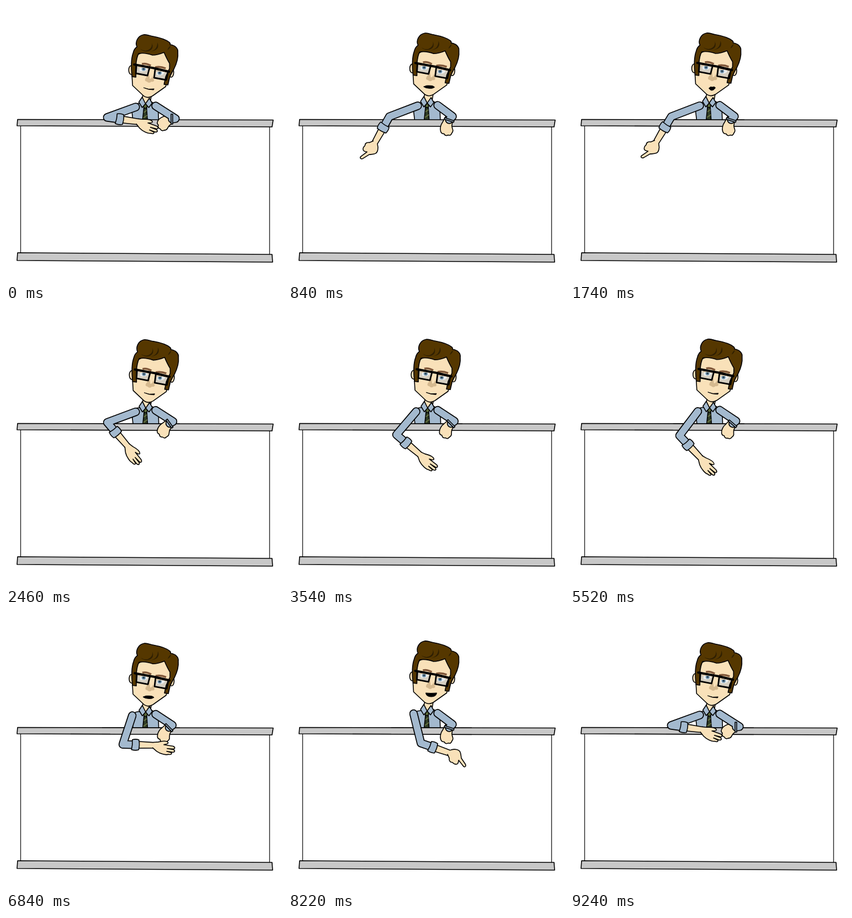
Recreate the animation shown at these times as an HTML page. Size 500x500 px, loop 9.96 s.

```html
<!DOCTYPE html>
<html lang="en">
<head>
<meta charset="utf-8">
<title>Presenter</title>
<style>
html, body { margin: 0; width: 100%; height: 100%; overflow: hidden; background: #fff; }
svg { display: block; width: 100vw; height: 100vh; }
.ln { stroke: #000; stroke-width: 1.6; stroke-linejoin: round; stroke-linecap: round; }
.side { fill: none; stroke: #222; stroke-width: 1.4; }
.skin { fill: #f9e1b9; }
.shirt { fill: #a3b9ce; }
.hair { fill: #553700; }
.bar { fill: #c8c8c8; }
.arm { fill: none; stroke-linejoin: round; stroke-linecap: round; }
.edge { stroke: #000; stroke-width: 15.4; }
.cloth { stroke: #a3b9ce; stroke-width: 12; }
</style>
</head>
<body>
<svg viewBox="0 0 500 500">
  <defs><clipPath id="above"><rect width="500" height="207"/></clipPath></defs>
  <path class="side" d="M26.500 217V448M477.500 218V450"/>

  <g clip-path="url(#above)">
    <g id="body">
      <path class="ln shirt" d="M243 176L236 177Q227 180 228 188L231 214H277L276 186Q272 177 262 173Z"/>
      <path class="ln skin" d="M249 158L264 160L262 172L253 180L246 172Z"/>
      <path class="ln" fill="#2f3c26" d="M250 184H255L257 214H247Z"/>
      <path class="ln" fill="#5b6a3a" d="M249 178H257L255 185H250Z"/>
      <path stroke="#66703f" stroke-width="2" d="M250 193L255 189M249 203L256 198"/>
      <path class="ln shirt" d="M247 165L241 174L247 184L253 177ZM260 167L265 176L259 184L253 177Z"/>
    </g>
  </g>

  <g id="head">
    <ellipse class="ln skin" cx="227.500" cy="116" rx="4.500" ry="8"/>
    <ellipse class="ln skin" cx="300" cy="120" rx="4.500" ry="9"/>
    <path class="ln skin" d="M232 92L229 128L230 144L248 161Q256 169 266 163L290 146L300 104L301 84L270 72Z"/>
    <path fill="#c9c9c5" fill-opacity=".75" d="M237 107L261 111L257 126L236 122ZM271 114L294 119L291 134L269 130Z"/>
    <path fill="#e9eef0" d="M242 112Q250 108 257 114Q254 120 243 118ZM273 119Q281 115 288 121Q284 127 274 125Z"/>
    <g id="eyes">
      <circle cx="250" cy="114" r="3.600" fill="#6f93ae"/><circle cx="250" cy="114" r="1.700" fill="#243a4b"/>
      <circle cx="279" cy="121" r="3.600" fill="#6f93ae"/><circle cx="279" cy="121" r="1.700" fill="#243a4b"/>
    </g>
    <path fill="#dcc8a8" d="M240 110Q249 106 258 112V114Q249 110 241 113ZM272 117Q281 113 290 119V121Q281 117 272 120Z"/>
    <path fill="#d5b98f" d="M260 122L253 132Q251 136 256 137Q260 141 264 137Q269 138 269 134L266 126Q265 132 261 132Z"/>
    <path fill="none" stroke="#80583a" stroke-width="3.500" d="M247 105Q254 103 263 108M271 111Q280 109 290 113"/>
    <path class="ln hair" d="M229 128C227 110 227 96 231 85Q233 77 238 74C234 66 239 54 250 52C257 51 262 55 267 55C278 57 291 61 297 66Q299 68 298 70C307 71 313 77 312 84C313 94 309 106 305 114Q299 124 297 130L294 143L287 142L290 128L297 113L297 104Q292 96 287 84Q275 89 266 89Q253 84 241 86Q237 93 236 108L236 129Z"/>
    <path fill="#2f1f02" d="M244 78Q254 84 261 78Q266 74 265 67Q269 77 261 81Q252 85 244 78ZM261 83Q275 80 275 66Q281 80 261 83ZM299 72Q295 74 293 80Q298 77 299 72Z"/>
    <path fill="none" stroke="#000" stroke-width="2.800" stroke-linejoin="round" d="M237 107L261 111L257 126L236 122ZM271 114L294 119L291 134L269 130Z"/>
    <path fill="none" stroke="#000" stroke-width="4" stroke-linecap="round" d="M233 106L260 111L271 113L296 119"/>
    <path id="mouth" stroke="#000" stroke-linejoin="round"/>
  </g>

  <path class="ln bar" d="M21 205.500L484 206.500L482 219L20 217Z"/>
  <path class="ln bar" d="M21 447L482 450L483 464L20 461Z"/>

  <path id="farHand" class="ln skin" d="M-3 8L8 10C14 12 21 11 25 8Q29 5 27 1Q31 -3 27 -7Q27 -12 22 -12Q17 -14 14 -11Q11 -9 9 -8L-3 -6"/>
  <path class="arm edge far"/>
  <path class="arm cloth far"/>
  <path id="farCuff" class="ln shirt" d="M-1 -9H2V9H-1Z"/>

  <path id="fore" class="ln skin" d="M18 -6.500L59 -5V5L18 6.500Z"/>
  <path id="hand" class="ln skin"/>
  <path class="arm edge near"/>
  <path class="arm cloth near"/>
  <path id="cuff" class="ln shirt" d="M17 -9Q23 -11 29 -9Q31 0 29 9Q23 11 16 9Q18 0 17 -9Z"/>
</svg>
<script>
const LOOP = 9960, STEP = 60, SWING = 830, UPPER = 55, FORE = 57;
const $ = id => document.getElementById(id);
const mix = (a, b, k) => a + (b - a) * k;
const ease = x => { const k = Math.max(0, Math.min(1, x)); return k * k * (3 - 2 * k); };
const polar = ([x, y], r, deg) => {
  const a = deg * Math.PI / 180;
  return [x + r * Math.cos(a), y + r * Math.sin(a)];
};
const put = (id, x, y, a = 0) => $(id).setAttribute('transform', `translate(${x} ${y}) rotate(${a})`);
const line = (cls, pts) => document.querySelectorAll(cls).forEach(p => p.setAttribute('d', 'M' + pts.join('L')));

// joint angles in degrees
const rest = { upper: 160, fore: 8, hand: 20 };
const gestures = [
  { from: 60, to: 2870, upper: 159, fore: 121, hand: 137, point: true },
  { from: 3060, to: 6040, upper: 112, fore: 82, hand: 88, point: false },
  { from: 6360, to: 9240, upper: 76, fore: 19, hand: 43, point: true }
];

const hands = {
  open: 'M-2 -5L6 -7C13 -10 21 -12 24 -9C25 -6 19 -5 17 -4L34 -4C39 -3 38 1 34 1L24 2L36 2C40 4 38 7 34 7L24 7L33 8C35 11 31 12 28 12C25 14 14 14 6 10L-2 5',
  point: 'M-4 -5C0 -12 6 -15 10 -14C15 -12 17 -9 20 -7L33 -4C37 -2 36 2 32 1L19 -1C22 3 23 6 20 8C17 11 14 9 13 10C10 13 6 11 4 8L-3 5'
};
const mouths = {
  smile: 'M250 148Q259 152 269 150L268 152Q258 152 250 148Z',
  small: 'M254 152Q257 148 260 150Q264 148 266 151Q263 156 259 156Q256 155 254 152Z',
  wide: 'M248 149Q254 146 259 147Q266 147 268 150Q264 153 258 152Q252 152 248 149Z',
  big: 'M252 146Q261 147 272 146Q271 153 262 153Q253 153 252 146Z'
};
const chatter = ['smile', 'small', 'wide', 'big', 'small'];

function draw(t) {
  const g = gestures.find(g => t < g.to) || gestures[2];
  const k = ease((t - g.from) / SWING) * ease((g.to - t) / SWING);
  const swing = 4 * k * (1 - k);
  const held = Math.max(0, t - g.from - SWING);
  const bounce = Math.exp(-held / 250) * Math.sin(held / 150);

  // forearm and hand trail the upper arm, then overshoot and settle
  const upper = mix(rest.upper, g.upper, k);
  const fore = mix(rest.fore, g.fore, k) - 14 * swing + 12 * bounce;
  const hand = mix(rest.hand, g.hand, k) - 26 * swing + 16 * bounce;
  const bob = 3.3 * swing - 3 * k - 2 * bounce;

  put('head', bob * .6 - .7, bob);
  put('body', bob * .2 - .3, bob * .4);
  put('eyes', -k, 0);
  const talking = k > (g.point ? .5 : .9);
  $('mouth').setAttribute('d', mouths[talking ? chatter[Math.floor(t / 120) % chatter.length] : 'smile']);

  const farElbow = [mix(307, 298, k), mix(204, 200, k)];
  const farWrist = [mix(301, 292, k), mix(205, 206, k)];
  line('.far', [[271, 181 + bob * .4], farElbow, farWrist]);
  put('farHand', ...farWrist, mix(155, 108, k));
  put('farCuff', ...farWrist, mix(180, 108, k));

  const shoulder = [227.5 + 7.5 * ease((upper - 90) / 70), 183 + bob * .8];
  const elbow = polar(shoulder, UPPER, upper);
  line('.near', [shoulder, elbow, polar(elbow, 18, fore)]);
  put('fore', ...elbow, fore);
  put('cuff', ...elbow, fore);
  put('hand', ...polar(elbow, FORE, fore), hand);
  $('hand').setAttribute('d', hands[g.point && k > .75 ? 'point' : 'open']);
}

function tick() {
  const t = performance.now() % LOOP;
  draw(Math.floor(t / STEP) * STEP);
  requestAnimationFrame(tick);
}
tick();
</script>
</body>
</html>
```
